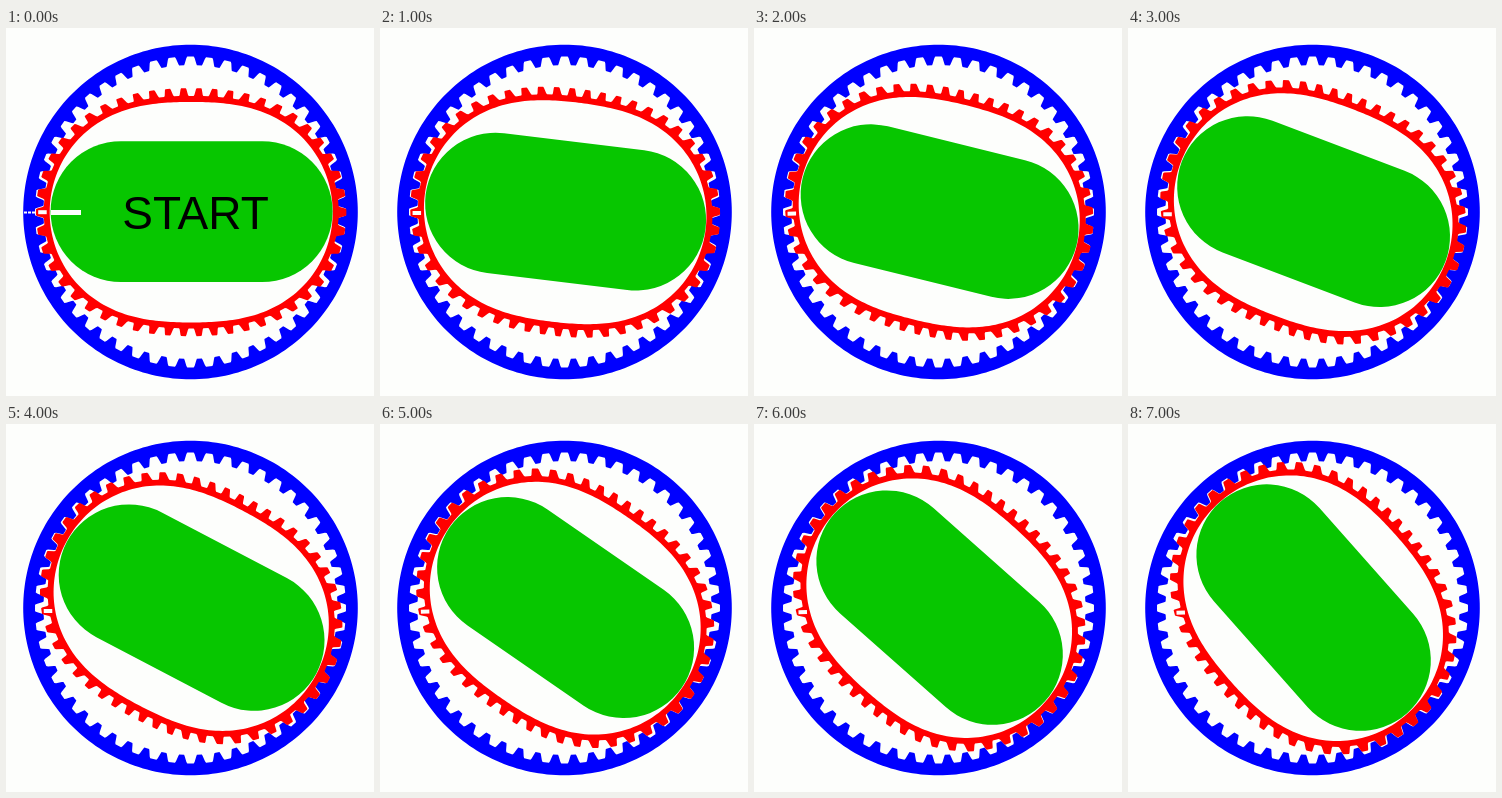
These frames come from a looping animation (368x368 px, 8000 ms). An HTML page:

```html
<!DOCTYPE html>
<html lang="en">
<head>
<meta charset="utf-8">
<title>Strain wave gear</title>
<style>
  html, body { margin: 0; width: 100%; height: 100%; overflow: hidden; background: #fdfefc; }
  svg { display: block; width: 100vw; height: 100vh; }
  .ring { fill: #00f; }
  .flex { fill: #f00; }
  .wave { fill: #07c600; }
  .mark { fill: #fdfefc; }
  text { font: 46px Arial, "Liberation Sans", sans-serif; text-anchor: middle; }
</style>
</head>
<body>
<svg viewBox="0 0 368 368">
  <path id="ring" class="ring" fill-rule="evenodd" transform="translate(184.5 184)"/>
  <g transform="translate(185.2 184.2)">
    <path id="flex" class="flex" fill-rule="evenodd"/>
    <rect id="notch" class="mark" y="-2" width="8.5" height="4"/>
  </g>
  <g transform="translate(185.6 183.6)">
    <rect id="wave" class="wave" x="-141" y="-70.4" width="282" height="140.8" rx="70.4"/>
  </g>
  <g id="start">
    <rect class="mark" x="45" y="182" width="30" height="5"/>
    <path d="M18 184.5H30" stroke="#fdfefc" stroke-width="2" stroke-dasharray="3 1"/>
    <text x="189.5" y="201">START</text>
  </g>
</svg>
<script>
  const RING_TEETH = 52, FLEX_TEETH = 50, STEPS = 8, STEP_MS = 1000;
  const WAVE_STEP = 360 / RING_TEETH;
  const FLEX_STEP = WAVE_STEP - 360 / FLEX_TEETH;
  const TAU = 2 * Math.PI;
  const $ = id => document.getElementById(id);

  // Inner radius of the flexed ring, measured from the major axis.
  const flexRadius = a => 127.1 + 15.6 * Math.cos(2 * a) - 1.2 * Math.cos(4 * a);

  const point = (a, r) => (r * Math.cos(a)).toFixed(2) + ' ' + (r * Math.sin(a)).toFixed(2);
  const closed = points => 'M' + points.join('L') + 'Z';

  function smooth(radius) {
    return closed(Array.from({ length: 240 }, (_, i) => {
      const a = i / 240 * TAU;
      return point(a, radius(a));
    }));
  }

  // Each profile entry is [offset in pitches, radial offset].
  function toothed(count, radius, profile) {
    const points = [];
    for (let i = 0; i < count; i++) {
      for (const [shift, rise] of profile) {
        const a = (i + shift) / count * TAU;
        points.push(point(a, radius(a) + rise));
      }
    }
    return closed(points);
  }

  const mirror = half => [...half.map(([s, r]) => [-s, r]), ...half.reverse()];

  $('ring').setAttribute('d', smooth(() => 167.3) + toothed(RING_TEETH, () => 147,
    mirror([[.36, 0], [.32, 1.5], [.22, 7], [.17, 8.5]])));
  $('flex').setAttribute('d', smooth(flexRadius) + toothed(FLEX_TEETH, flexRadius,
    mirror([[.33, 6], [.28, 7.2], [.19, 12.6], [.15, 13.7]])));

  function draw() {
    const n = Math.floor(performance.now() / STEP_MS) % STEPS;
    const turn = `rotate(${n * WAVE_STEP})`;
    $('wave').setAttribute('transform', turn);
    $('flex').setAttribute('transform', turn);
    const r = flexRadius(n / FLEX_TEETH * TAU);
    $('notch').setAttribute('transform', `rotate(${n * FLEX_STEP}) translate(${-r - 11.5} 0)`);
    $('start').style.display = n ? 'none' : '';
    requestAnimationFrame(draw);
  }
  draw();
</script>
</body>
</html>
```
